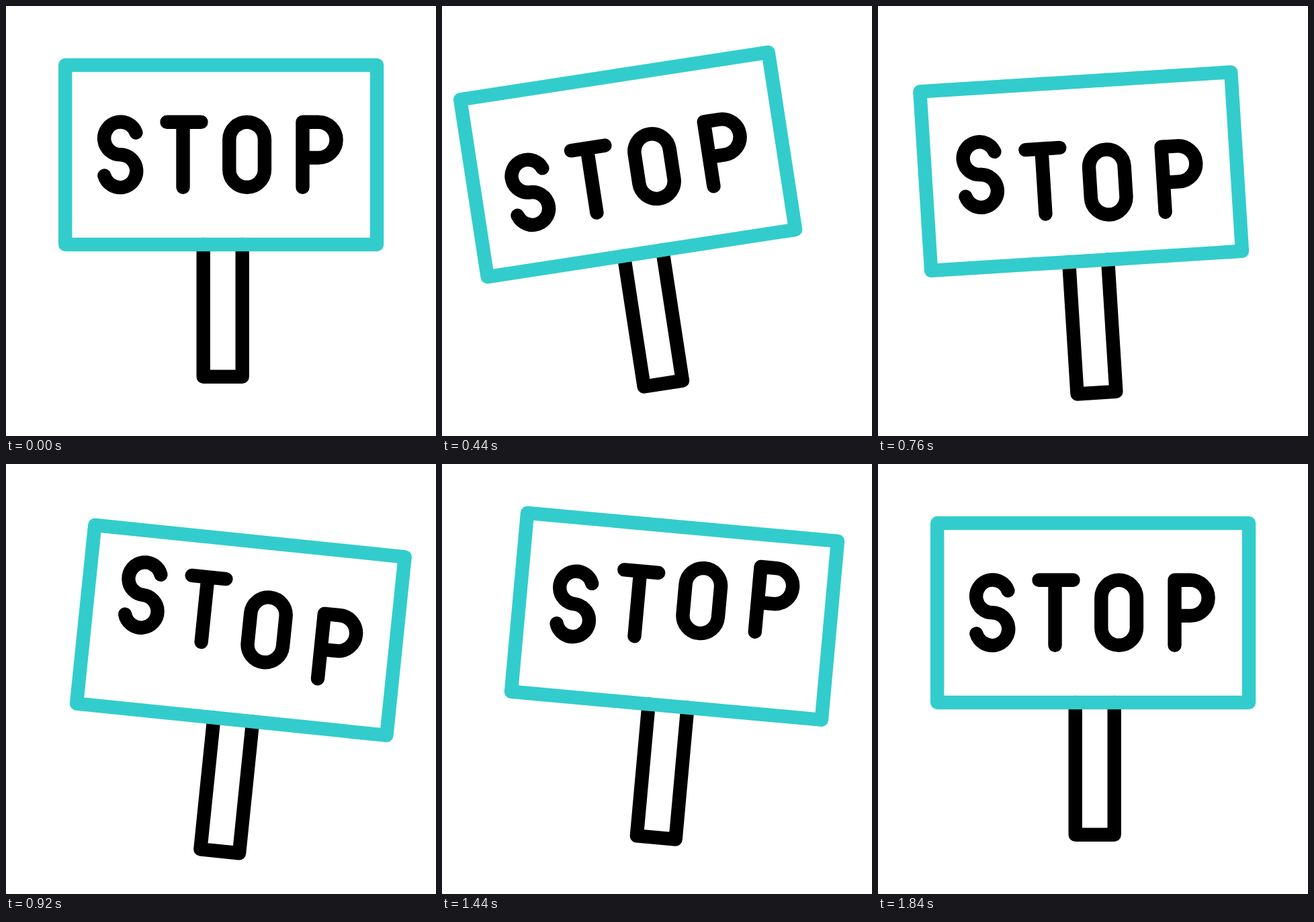
An HTML page for the animation above (1880 ms loop, 640x640 px).

```html
<!DOCTYPE html>
<html lang="en">
<head>
<meta charset="utf-8">
<title>Swinging stop sign</title>
<style>
  html, body { margin: 0; width: 100%; height: 100%; overflow: hidden; background: #fff; }
  svg { display: block; width: 100vw; height: 100vh; }
  path, rect { fill: none; stroke: #000; stroke-width: 20.4; stroke-linecap: round; stroke-linejoin: round; }
  .board { stroke: #3cc; }
</style>
</head>
<body>
<svg viewBox="0 0 640 640" role="img" aria-label="STOP">
  <g id="sign">
    <path d="M293.7 355V551.8H351.7V355"/>
    <rect class="board" x="88.2" y="88" width="463.8" height="267"/>
    <path class="letter" d="M193.4 188.5A24.4 24.4 0 1 0 171 221.3H169.5A24.4 24.4 0 1 1 146.4 252.5"/>
    <path class="letter" d="M239.5 172.7H290.5M263.5 172.7V269.8"/>
    <rect class="letter" x="332.3" y="172.7" width="52.6" height="97.1" rx="26.3"/>
    <path class="letter" d="M441.5 269.8V172.7H465a26.6 26.6 0 0 1 0 53.2H441.5"/>
  </g>
</svg>
<script>
  const LOOP = 1880, STEP = 40, STAGGER = 80;

  // Each track is a list of [time, value]
  const swing = [[0, 0], [520, -9], [1113, 9], [1815, 0]];
  const drop = [[60, 0], [850, 24.5], [880, 24.5], [1705, 0]];
  const bounce = [[55, 0], [532, 20], [1038, -42], [1590, 0]];

  const sign = document.getElementById('sign');
  const letters = document.querySelectorAll('.letter');

  // cubic-bezier(.55, 0, .45, 1), solved by bisection
  function ease(x) {
    let lo = 0, hi = 1, s = x;
    for (let i = 0; i < 24; i++) {
      s = (lo + hi) / 2;
      const r = 1 - s;
      if (1.65 * r * r * s + 1.35 * r * s * s + s * s * s < x) lo = s; else hi = s;
    }
    return s * s * (3 - 2 * s);
  }

  function valueAt(track, t) {
    if (t <= track[0][0]) return track[0][1];
    for (let i = 1; i < track.length; i++) {
      const [t0, v0] = track[i - 1], [t1, v1] = track[i];
      if (t < t1) return v0 + (v1 - v0) * ease((t - t0) / (t1 - t0));
    }
    return track[track.length - 1][1];
  }

  function draw(t) {
    sign.setAttribute('transform',
      `translate(0 ${valueAt(drop, t)}) rotate(${valueAt(swing, t)} 320 508)`);
    letters.forEach((letter, i) =>
      letter.setAttribute('transform', `translate(0 ${valueAt(bounce, t - i * STAGGER)})`));
  }

  const start = performance.now();
  function tick() {
    const t = (performance.now() - start) % LOOP;
    draw(Math.floor(t / STEP) * STEP);
    requestAnimationFrame(tick);
  }
  tick();
</script>
</body>
</html>
```
